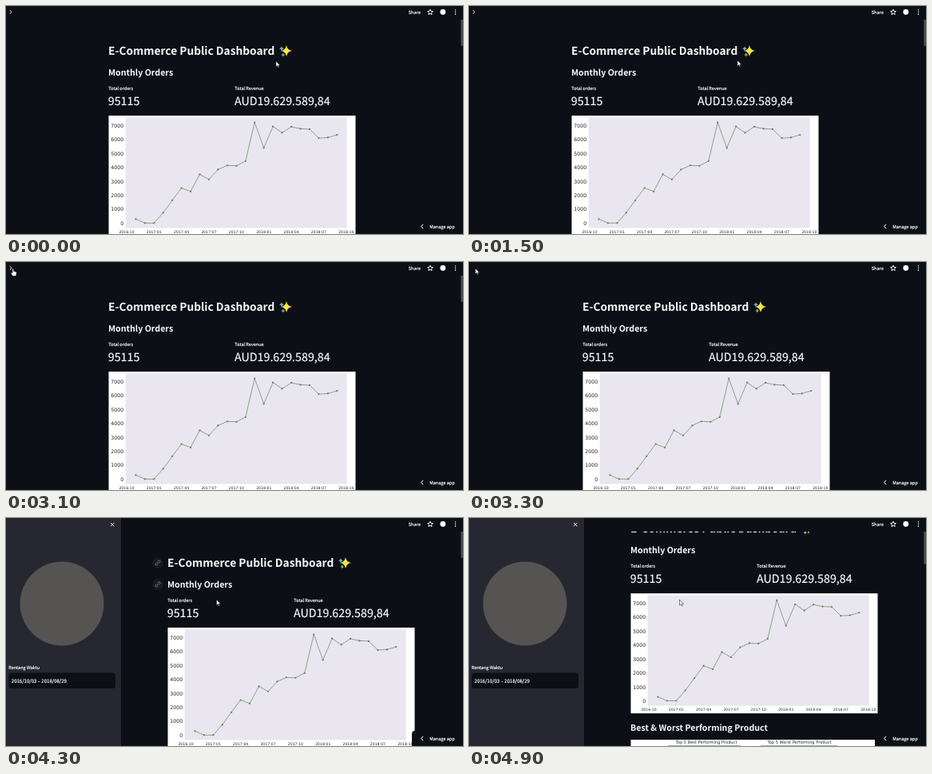
An HTML page that plays this animation: 572 by 285 pixels, repeating every 5000 ms.

```html
<!DOCTYPE html>
<html lang="en">
<head>
<meta charset="utf-8">
<title>Dashboard</title>
<style>
  html, body { margin: 0; width: 100%; height: 100%; overflow: hidden; background: #0c0f16; }
  svg { display: block; width: 572px; height: 285px; }
  text { font: 5.55px "Noto Sans CJK JP", "Noto Sans CJK SC", "Noto Sans CJK", "Open Sans", sans-serif;
         fill: #fafafa; stroke: #fafafa; stroke-width: .18;
         text-rendering: geometricPrecision; white-space: pre; }
  .h1 { font-size: 13.73px; font-weight: 700; stroke: none; }
  .h2 { font-size: 10.63px; font-weight: 700; stroke: none; }
  .num { font-size: 14.25px; }
  .date { font-size: 6.05px; }
  .plot text { font-family: "DejaVu Sans", sans-serif; fill: #262626; stroke: none; }
  .plot .y { font-size: 6.3px; text-anchor: end; }
  .plot .x { font-size: 4.6px; text-anchor: middle; }
  .plot .cap { font-size: 5.1px; text-anchor: middle; }
  .icon { fill: none; stroke: #fafafa; stroke-width: 1; }
</style>
</head>
<body>
<svg viewBox="0 0 572 285">
  <defs>
    <path id="spark" d="M0-7Q1-1 7 0Q1 1 0 7Q-1 1-7 0Q-1-1 0-7Z"/>
    <g id="link">
      <circle r="7" fill="#171a22"/>
      <g transform="rotate(-45)" fill="none" stroke="#8b8d94" stroke-width=".8">
        <path d="M-.8-1.4H-2.3a1.4 1.4 0 0 0 0 2.8H-.8M.8-1.4H2.3a1.4 1.4 0 0 1 0 2.8H.8M-1.5 0H1.5"/>
      </g>
    </g>
  </defs>
  <rect width="572" height="285" fill="#0c0f16"/>

  <g id="main">
    <text class="h1" x="128" y="61">E-Commerce Public Dashboard</text>
    <use href="#spark" x="351" y="56" fill="#fde636"/>
    <use href="#spark" transform="translate(345 53.3) scale(.42)" fill="#62b8dc"/>
    <use href="#spark" transform="translate(346.8 61) scale(.36)" fill="#7cc4a4"/>
    <text class="h2" x="128" y="87">Monthly Orders</text>
    <text x="128.3" y="105">Total orders</text>
    <text class="num" x="127.8" y="124">95115</text>
    <text x="286.3" y="105">Total Revenue</text>
    <text class="num" x="286.1" y="124">AUD19.629.589,84</text>
    <g id="links"><use href="#link" x="116" y="56"/><use href="#link" x="116" y="83"/></g>
    <g class="plot" id="chart">
      <rect x="128.5" y="137" width="309" height="150" fill="#fff"/>
      <rect x="149.7" y="139.5" width="277" height="138" fill="#e9e6f0"/>
    </g>
    <text class="h2" x="128" y="309.3">Best &amp; Worst Performing Product</text>
    <g class="plot">
      <rect x="128.5" y="320" width="305.5" height="150" fill="#fff"/>
      <text class="cap" x="223" y="325">Top 5 Best Performing Product</text>
      <text class="cap" x="339.5" y="325">Top 5 Worst Performing Product</text>
      <path d="M175 327.5H266M291 327.5H387" stroke="#8fa383" stroke-width="1"/>
    </g>
  </g>

  <rect width="572" height="17" fill="#0c0f16"/>
  <path id="open" class="icon" d="M4.9 5.3L7.1 7.5L4.9 9.7"/>
  <text x="503.8" y="9.6">Share</text>
  <path class="icon" stroke-width=".8" d="M531 4.2L532 6.5L534.4 6.7L532.6 8.3L533.1 10.7L531 9.4L528.9 10.7L529.4 8.3L527.6 6.7L530 6.5Z"/>
  <circle cx="546.8" cy="7.5" r="3.4" fill="#fafafa"/>
  <path d="M562.5 4.9v.01m0 2.6v.01m0 2.6v.01" stroke="#fafafa" stroke-width="1.5" stroke-linecap="round"/>
  <rect id="thumb" x="569.3" y="17" width="2.7" height="33" rx="1" fill="#4b4d54"/>
  <path d="M508 285V270a4 4 0 0 1 4-4H572V285Z" fill="#0c0f16"/>
  <path class="icon" d="M522.2 272.8L519.6 275.5L522.2 278.2"/>
  <text x="530.2" y="277.8">Manage app</text>

  <g id="side">
    <rect x="-10" width="154" height="285" fill="#262730"/>
    <path class="icon" d="M131 6L135.4 10.4M135.4 6L131 10.4"/>
    <circle cx="70" cy="107" r="52.5" fill="#555453"/>
    <text x="3.2" y="188.7">Rentang Waktu</text>
    <rect x="3.5" y="193.5" width="133.5" height="19.5" rx="3.5" fill="#0c0f16"/>
    <text class="date" x="6.8" y="205.5">2016/10/03 – 2018/08/29</text>
  </g>

  <g id="cursor" fill="#fff" stroke="#111" stroke-width=".5" stroke-linejoin="round">
    <path id="arrow" d="M0 0V7L1.6 5.6L2.7 8L3.7 7.6L2.7 5.2H4.9Z"/>
    <path id="hand" d="M0 .8Q.8-.2 1.6 .8V3.6L4.4 4.2Q5.4 4.5 5.2 5.6L4.6 9.6H.6L-2 6Q-2.2 4.9-1 5.2L0 6Z"/>
  </g>
</svg>
<script>
const $ = id => document.getElementById(id);
const move = (el, x, y) => el.setAttribute('transform', `translate(${x} ${y})`);
const show = (el, on) => el.setAttribute('visibility', on ? 'visible' : 'hidden');

// Monthly orders chart
const orders = [290, 5, 5, 745, 1640, 2520, 2270, 3500, 3130, 3840, 4140, 4110,
  4450, 7220, 5390, 6930, 6480, 6910, 6770, 6740, 6100, 6140, 6330];
const points = orders.map((v, i) => [162.4 + i * 11.45, 271.4 - v * .01743]);
let chart = '';
for (let i = 0; i < 8; i++)
  chart += `<text class="y" x="147.2" y="${273.8 - i * 17.43}">${i * 1000}</text>`;
for (let i = 0; i < 9; i++) {
  const m = 9 + i * 3;
  const label = `${2016 + Math.floor(m / 12)}-${String(m % 12 + 1).padStart(2, '0')}`;
  chart += `<text class="x" x="${151 + i * 34.35}" y="284">${label}</text>`;
}
chart += `<polyline points="${points.join(' ')}" fill="none" stroke="#799570" stroke-width=".85"/>`;
for (const [x, y] of points) chart += `<circle cx="${x}" cy="${y}" r="1.1" fill="#63805a"/>`;
$('chart').insertAdjacentHTML('beforeend', chart);

// Linear interpolation through [time, ...values] rows
function track(rows, t) {
  const n = rows.findIndex(r => r[0] > t);
  if (n === 0) return rows[0].slice(1);
  if (n < 0) return rows[rows.length - 1].slice(1);
  const a = rows[n - 1], b = rows[n], k = (t - a[0]) / (b[0] - a[0]);
  return a.slice(1).map((v, i) => v + (b[i + 1] - v) * k);
}

const pointer = [[0, 338, 69], [1200, 338, 69], [1500, 336, 68], [1600, 295, 60],
  [1800, 113, 26], [2000, 62, 15], [2400, 25, 7], [2500, 15.5, 5.5], [2800, 8, 8],
  [3600, 8, 8], [3800, 70, 28], [4000, 200, 78], [4200, 263.5, 102]];
const shift = [[3200, 0], [3300, 14], [3400, 74]];
const slide = [[3300, -144], [3400, -7.3], [3500, 0]];
const scroll = [[4600, 0], [4700, 9], [4800, 32], [4900, 42.8]];

function draw(now) {
  const t = Math.floor(now % 5000 / 100) * 100;
  const [top] = track(scroll, t);
  move($('main'), track(shift, t)[0], -top);
  move($('side'), track(slide, t)[0], 0);
  show($('side'), t >= 3400);
  show($('open'), t < 3300);
  show($('links'), t >= 4200 && t < 4500);
  show($('thumb'), t < 3300 || t >= 3500);
  $('thumb').setAttribute('height', 33 + top * .18);
  move($('cursor'), ...track(pointer, t));
  const hand = t >= 2500 && t < 3300;
  show($('hand'), hand);
  show($('arrow'), !hand);
}

const start = performance.now();
function tick() {
  draw(performance.now() - start);
  requestAnimationFrame(tick);
}
tick();
</script>
</body>
</html>
```
